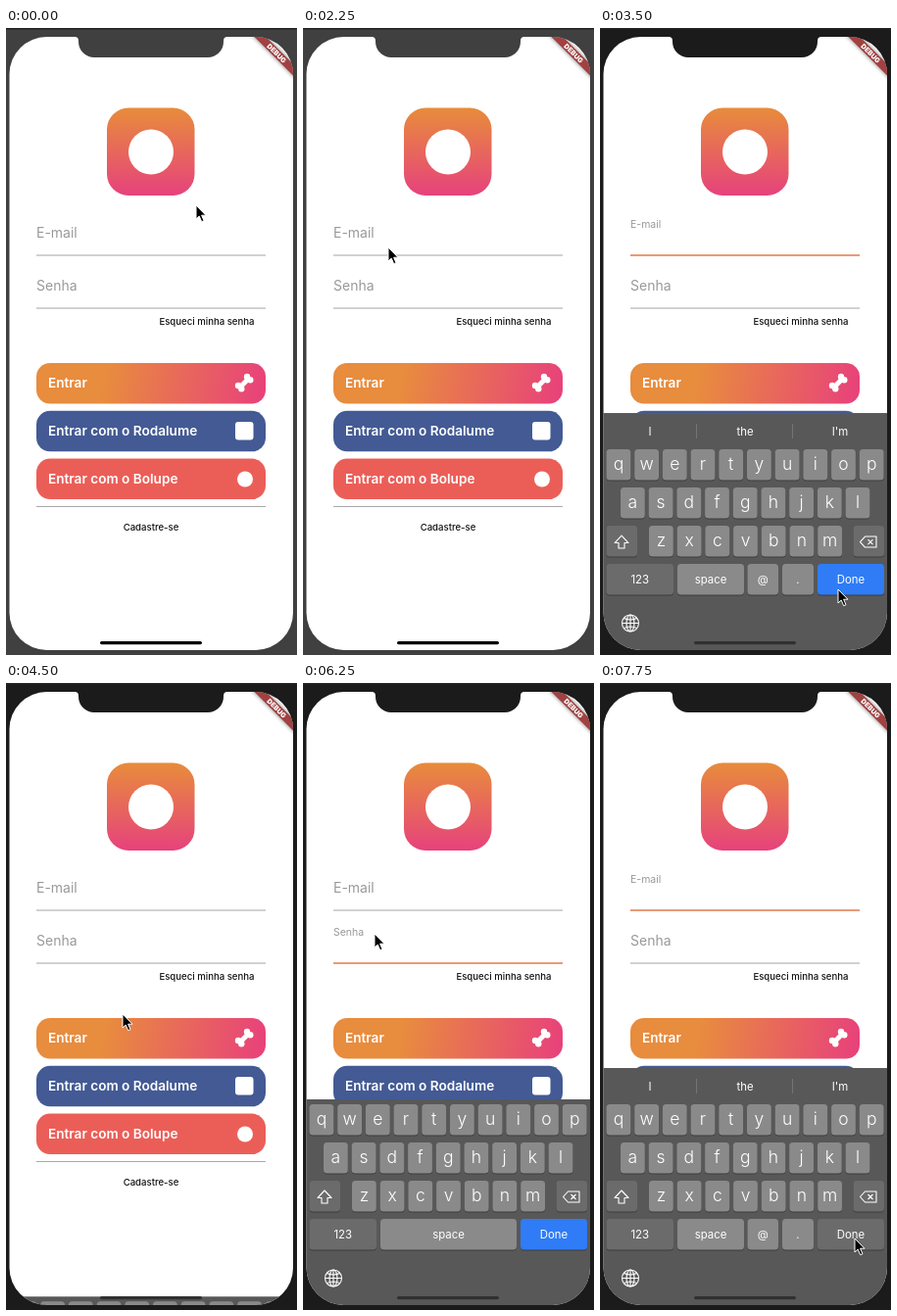
An HTML page that plays this animation: 297 px wide and 640 px high, repeating every 8000 ms.

```html
<!DOCTYPE html>
<html lang="pt">
<head>
<meta charset="utf-8">
<style>
  html, body { margin: 0; width: 100%; height: 100%; overflow: hidden; background: #404040; }
  svg { display: block; width: 297px; height: 640px; font-family: Inter, Roboto, sans-serif; }
  .field { fill: #999; }
  .link { font-size: 9.6px; font-weight: 500; fill: #111; }
  .button { font-size: 13.6px; font-weight: 600; fill: #fff; }
  .key { font-size: 17.5px; font-weight: 300; fill: #fff; text-anchor: middle; }
  .small { font-size: 11.4px; font-weight: 400; }
  .icon { fill: none; stroke: #fff; stroke-width: 1.1; stroke-linejoin: round; }
</style>
</head>
<body>
<svg viewBox="0 0 297 640">
  <defs>
    <linearGradient id="tile" x2="0" y2="1">
      <stop stop-color="#e88c3b"/><stop offset="1" stop-color="#e6427c"/>
    </linearGradient>
    <linearGradient id="enter" gradientUnits="userSpaceOnUse" x1="31" y1="342" x2="265" y2="383">
      <stop offset=".3" stop-color="#e88c3e"/><stop offset="1" stop-color="#e8407c"/>
    </linearGradient>
    <clipPath id="screen">
      <path d="M3.5 47a38 38 0 0 1 38-38H70q4 0 4 4v1a16 16 0 0 0 16 16H206a16 16 0 0 0 16-16v-1q0-4 4-4H255a38 38 0 0 1 38 38V597a38 38 0 0 1-38 38H41.5a38 38 0 0 1-38-38Z"/>
    </clipPath>
    <clipPath id="viewport"><rect id="visible" width="297" height="640"/></clipPath>
    <filter id="blur" x="-20%" y="-100%" width="140%" height="300%"><feGaussianBlur stdDeviation="2"/></filter>
  </defs>
  <rect id="bezel" width="297" height="640"/>
  <rect width="297" height="1.5" fill="#222"/>
  <g clip-path="url(#screen)">
    <rect width="297" height="640" fill="#fff"/>
    <g clip-path="url(#viewport)">
      <rect x="103" y="81.5" width="89.5" height="89.5" rx="22" fill="url(#tile)"/>
      <circle cx="148" cy="126.5" r="23" fill="#fff"/>
      <g id="form"></g>
      <text class="link" x="253.500" y="303" text-anchor="end">Esqueci minha senha</text>
      <g id="buttons"></g>
      <g fill="#fff">
        <path d="M239 366.500L247.500 358" stroke="#fff" stroke-width="5"/>
        <circle cx="237" cy="365" r="3.200"/><circle cx="240.300" cy="368.300" r="3.200"/>
        <circle cx="246" cy="356" r="3.200"/><circle cx="249.300" cy="359.300" r="3.200"/>
        <rect x="234" y="402" width="18.500" height="18.500" rx="3"/>
        <circle cx="244" cy="460.500" r="8"/>
      </g>
      <path d="M31 488.500H265" stroke="#aaa"/>
      <text class="link" x="148" y="512.500" text-anchor="middle">Cadastre-se</text>
    </g>
    <g transform="translate(293 9) rotate(45)">
      <rect x="-40" y="19.600" width="80" height="8.400" opacity=".5" filter="url(#blur)"/>
      <rect x="-40" y="19.600" width="80" height="8.400" fill="#a24141"/>
      <text y="26.300" font-size="7" font-weight="900" fill="#fff" text-anchor="middle">DEBUG</text>
    </g>
    <g id="keyboard">
      <rect id="panel" width="297" height="260" fill="#585858"/>
      <g id="keys"></g>
      <g id="emailKeys"></g>
      <g id="passwordKeys"></g>
      <g class="icon">
        <path d="M22 518l7 7.500h-4v5.500h-6v-5.500h-4Z"/>
        <path d="M265.500 524.500l5-5.500h11.500v11h-11.500ZM273.500 522l5 5m0-5l-5 5"/>
        <circle cx="31" cy="607.500" r="8.500"/>
        <ellipse cx="31" cy="607.500" rx="4" ry="8.500"/>
        <path d="M31 599v17M22.500 607.500h17M24.500 602.500q6.500 3 13 0M24.500 612.500q6.500-3 13 0"/>
      </g>
    </g>
    <rect id="home" x="96" y="626" width="104" height="3.200" rx="1.600"/>
  </g>
  <path id="cursor" d="M0 0V14l3.200-3 2.500 5.700 2.300-1-2.400-5.500H10Z" stroke="#fff" stroke-width="1"/>
</svg>
<script>
const $ = id => document.getElementById(id);
const clamp = v => Math.max(0, Math.min(1, v));
const LOOP = 8000, STEP = 250, BLINK = 350;
const KEY_GRAY = '#8a8a8a', KEY_DARK = '#6b6b6b';

// Each session: focused field, focus and blur times
const sessions = [
  { field: 0, from: 2850, to: 4257 },
  { field: 1, from: 5096, to: 6600 },
  { field: 0, from: 6600, to: LOOP },
];

// Pointer path: time, x, y
const path = [
  [0, 194, 181], [250, 176, 300], [1250, 119, 504], [1500, 126, 470], [2000, 134, 343],
  [2250, 87, 224], [2750, 87, 224], [3250, 215, 500], [3500, 243, 573], [4000, 245, 571],
  [4500, 119, 338], [5000, 83, 276], [5250, 83, 276], [5750, 75, 260], [6250, 73, 256],
  [6500, 76, 214], [6750, 78, 214], [7500, 252, 579], [7750, 260, 567], [LOOP, 260, 567],
];

const fields = ['E-mail', 'Senha'].map((label, i) => ({ label, y: 232 + 54 * i }));
$('form').innerHTML = fields.map(({ label, y }, i) => `
  <text class="field" id="label${i}" x="31">${label}</text>
  <path id="line${i}" d="M31 ${y}H265"/>
  <rect id="caret${i}" x="31" y="${y - 25}" width="1.3" height="16" fill="#e07a4a"/>`).join('');

$('buttons').innerHTML = [
  ['Entrar', 'url(#enter)'],
  ['Entrar com o Rodalume', '#435a94'],
  ['Entrar com o Bolupe', '#eb5e58'],
].map(([label, fill], i) => `
  <rect x="31" y="${342 + 48.8 * i}" width="234" height="41.500" rx="14" fill="${fill}"/>
  <text class="button" x="43" y="${367.3 + 48.8 * i}">${label}</text>`).join('');

function key(label, x, row, width = 24.8, fill = KEY_GRAY, id = '') {
  const y = 430 + 39 * row, small = label.length > 1 || row === 3;
  return `<rect x="${x}" y="${y + 1}" width="${width}" height="31.500" rx="3.500" fill="#3c3c3c"/>
    <rect ${id && `id="${id}"`} x="${x}" y="${y}" width="${width}" height="31.500" rx="3.500" fill="${fill}"/>
    <text class="key ${small ? 'small' : ''}" x="${x + width / 2}" y="${y + (small ? 19.5 : 21)}">${label}</text>`;
}
const letters = (text, x, row) => [...text].map((c, i) => key(c, x + 28.7 * i, row)).join('');

$('keys').innerHTML = letters('qwertyuiop', 6.5, 0) + letters('asdfghjkl', 21, 1) + letters('zxcvbnm', 50, 2)
  + key('', 6.5, 2, 31.5, KEY_DARK) + key('', 258.5, 2, 31.5, KEY_DARK)
  + key('123', 6.5, 3, 68.5, KEY_DARK) + key('Done', 222, 3, 68, '#2f7cf6', 'done');
$('passwordKeys').innerHTML = key('space', 79, 3, 139);
$('emailKeys').innerHTML = key('space', 79, 3, 68) + key('@', 150.5, 3, 31.5) + key('.', 186, 3, 32)
  + ['I', 'the', "I'm"].map((word, i) => `<text class="key small" x="${51 + 97 * i}" y="416">${word}</text>`).join('')
  + '<path d="M98.500 404v15M196.500 404v15" stroke="#747474"/>';

// Remaining distance of a critically damped spring
function spring(ms) {
  const x = Math.max(0, ms) * 0.0183;
  return (1 + x) * Math.exp(-x);
}

function pointer(t) {
  const i = path.findIndex(p => p[0] > t);
  const [a, b] = [path[i - 1], path[i]], k = (t - a[0]) / (b[0] - a[0]);
  return [1, 2].map(n => a[n] + (b[n] - a[n]) * k);
}

const set = (id, attributes) => {
  for (const name in attributes) $(id).setAttribute(name, attributes[name]);
};
const show = (id, visible) => set(id, { visibility: visible ? 'visible' : 'hidden' });

function drawField({ y }, i, t, active) {
  const focused = active && active.field === i;
  const float = sessions.filter(s => s.field === i)
    .reduce((sum, s) => sum + clamp((t - s.from) / 240) - clamp((t - s.to) / 240), 0);
  set('label' + i, { y: y - 18.5 - 9.8 * float, 'font-size': 14 - 3.5 * float });
  set('line' + i, { stroke: focused ? '#e0784a' : '#a4a4a4', 'stroke-width': focused ? 1.5 : 1 });
  show('caret' + i, focused && (t - active.from) % (2 * BLINK) < BLINK);
}

function draw(t) {
  const active = sessions.find(s => t >= s.from && t < s.to);
  const email = Boolean(active && active.field === 0);
  const top = email ? 393 : 425, height = 640 - top;
  let offset = height;
  if (active) offset = active === sessions[2] ? 0 : height * spring(t - active.from);
  else if (t >= sessions[0].to) offset = height * (1 - spring(t - sessions[0].to));

  set('bezel', { fill: t < 2500 ? '#404040' : '#1b1b1b' });
  fields.forEach((field, i) => drawField(field, i, t, active));
  set('visible', { height: active ? top : 640 });
  set('keyboard', { transform: `translate(0 ${offset})` });
  set('panel', { y: top });
  show('emailKeys', email);
  show('passwordKeys', !email);
  const pressed = t >= 7750 || (t >= 4000 && t < 4257);
  set('done', { fill: pressed ? KEY_DARK : '#2f7cf6' });
  set('home', { fill: offset < height - 5 ? '#303030' : '#000' });
  set('cursor', { transform: `translate(${pointer(t)})` });
}

function tick() {
  const t = performance.now() % LOOP;
  draw(Math.floor(t / STEP) * STEP);
  requestAnimationFrame(tick);
}
tick();
</script>
</body>
</html>
```
